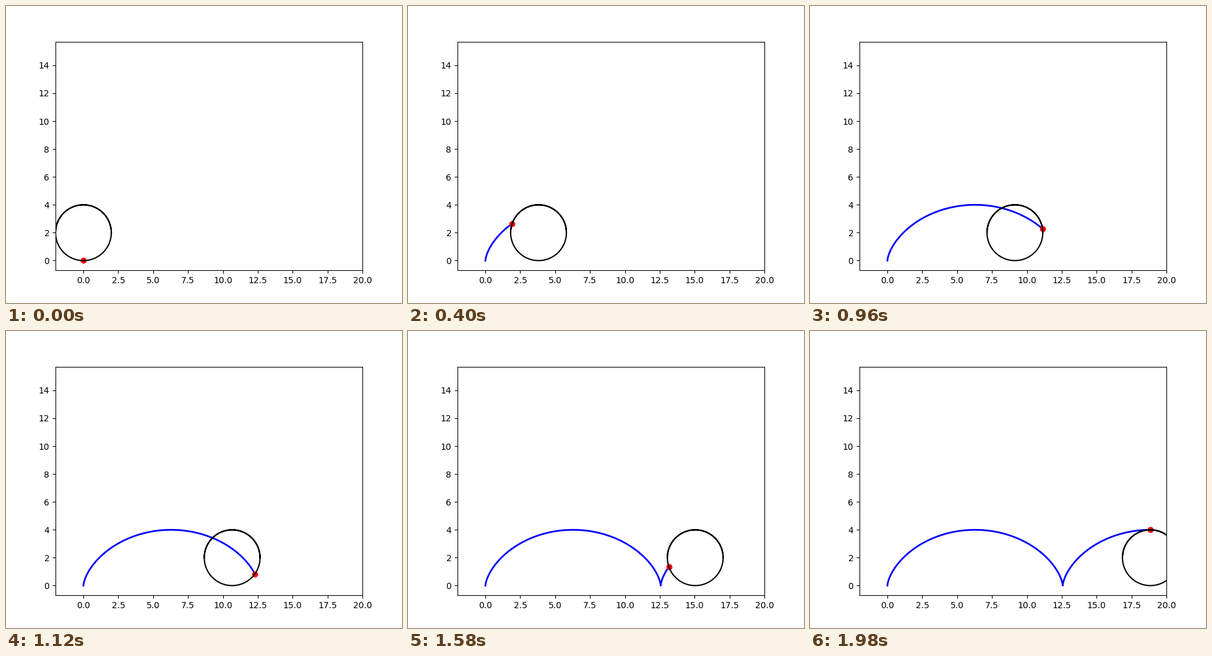
A matplotlib script that plays this animation: 640x480 px, repeating every 2000 ms.

```python
import numpy as np
import matplotlib.pyplot as plt
from matplotlib.animation import FuncAnimation

RADIUS = 2
FRAMES = 100

theta = np.linspace(0, 3 * np.pi, FRAMES)
path_x = RADIUS * (theta - np.sin(theta))
path_y = RADIUS * (1 - np.cos(theta))
rim_x = RADIUS * np.cos(theta)
rim_y = RADIUS * (1 + np.sin(theta))

fig, ax = plt.subplots(figsize=(6.4, 4.8), dpi=100)
ax.set_aspect("equal", adjustable="datalim")
ax.set_xlim(-2, 20)

# Centre the view on y = 7.5 with equal scales on both axes
box = ax.get_position(original=True)
half = 22 * (box.height * 4.8) / (box.width * 6.4) / 2
ax.set_ylim(7.5 - half, 7.5 + half)

trace, = ax.plot([], [], "b-", lw=2)
dot, = ax.plot([], [], "ro")
wheel, = ax.plot([], [], "k-", lw=1.5)


def update(i):
    trace.set_data(path_x[:i + 1], path_y[:i + 1])
    dot.set_data([path_x[i]], [path_y[i]])
    wheel.set_data(RADIUS * theta[i] + rim_x, rim_y)
    return trace, dot, wheel


anim = FuncAnimation(fig, update, frames=FRAMES, interval=20,
                     repeat=True, repeat_delay=0)
plt.show()
```
